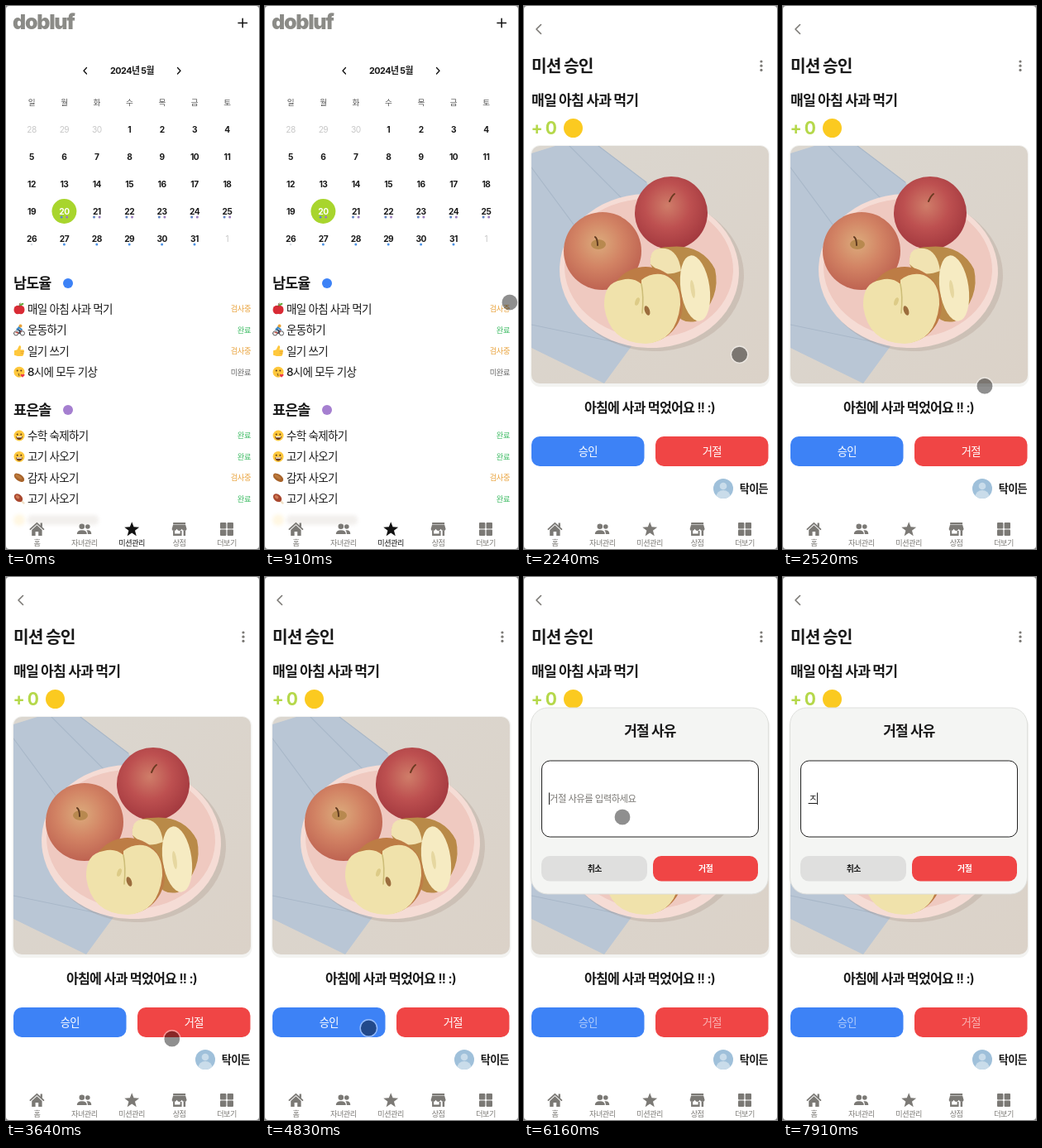
Recreate the animation shown at these times as an HTML page. Size 306 px wide and 656 px high, loop 8 s.

```html
<!DOCTYPE html>
<html lang="ko">
<head>
<meta charset="utf-8">
<title>미션 관리</title>
<style>
html, body { margin: 0; width: 100%; height: 100%; overflow: hidden; background: #888; }
svg { display: block; width: 306px; height: 656px; background: #fff; border-radius: 4px; }
text { font-family: Inter, "Noto Sans CJK KR", "Noto Sans CJK", sans-serif; letter-spacing: -.05em; white-space: pre; }
</style>
</head>
<body>
<svg id="stage" viewBox="0 0 306 656"></svg>
<script>
const INK = '#191919', GRAY = '#7b7975', BLUE = '#3d82f6', RED = '#f04545',
      GREEN = '#3dbb63', ORANGE = '#e9a23b', PURPLE = '#a57fd0';

// y is the visual middle of the line
const text = (x, y, s, size, weight = 400, fill = INK, anchor = 'start') =>
  `<text x="${x}" y="${y + size * .365}" font-size="${size}" font-weight="${weight}" fill="${fill}" text-anchor="${anchor}">${s}</text>`;
const mid = (x, y, s, size, weight, fill) => text(x, y, s, size, weight, fill, 'middle');
const rect = (x, y, w, h, r, fill, more = '') =>
  `<rect x="${x}" y="${y}" width="${w}" height="${h}" rx="${r}" fill="${fill}" ${more}/>`;
const dot = (x, y, r, fill, more = '') => `<circle cx="${x}" cy="${y}" r="${r}" fill="${fill}" ${more}/>`;
const oval = (x, y, rx, ry, fill, turn = 0) =>
  `<ellipse rx="${rx}" ry="${ry}" fill="${fill}" transform="translate(${x} ${y}) rotate(${turn})"/>`;
const shape = (d, fill) => `<path d="${d}" fill="${fill}"/>`;
const line = (d, color, w = 1.6) =>
  `<path d="${d}" fill="none" stroke="${color}" stroke-width="${w}" stroke-linecap="round" stroke-linejoin="round"/>`;
const group = (id, body) => `<g id="${id}">${body}</g>`;
const at = (x, y, body) => `<g transform="translate(${x} ${y})">${body}</g>`;

// small pictures, centred on 0,0
const face = dot(0, 0, 6.5, '#ffc83d') + dot(-2.3, -1.6, 1, '#5b3a12') + dot(2.3, -1.6, 1, '#5b3a12');
const emoji = {
  apple: oval(-2, 1, 4.5, 5.3, '#d92b35') + oval(2, 1, 4.5, 5.3, '#d92b35') +
    line('M0-3Q0-6 1-7', '#6b3d1e', 1) + oval(3, -5.5, 2.6, 1.2, '#63a83a', -25),
  bike: line('M-6.5 4a2.6 2.6 0 1 0 5.2 0a2.6 2.6 0 1 0-5.2 0M1.3 4a2.6 2.6 0 1 0 5.2 0a2.6 2.6 0 1 0-5.2 0', '#555', 1) +
    line('M-4 3L0 4L3 0', '#cf4a3f', 1.2) + line('M-2.5-1L1 1L0 4', '#34495e', 1.8) +
    line('M0-3.5L-2.5-.5M0-3L3-.5', '#3c8bc9', 2) + dot(1.5, -5, 2, '#e8a33d'),
  thumb: shape('M-6-.5L-2.5-1.5L0-6.5Q2.3-7 2.2-4.5L1.5-1.5H5Q6.5-1 5.8 .7L5 5Q4.5 6.3 3 6.3H-2L-6 5Z', '#ffc83d') +
    line('M2 .8H5.3M2 3H5', '#e0962a', .7),
  kiss: face + line('M-1 2q1.8.3.3 1.4q1.8.3.2 1.4', '#5b3a12', .8) +
    shape('M4 6.5L1.5 3.7Q2 1.8 4 3Q6 1.8 6.7 3.7Z', '#ec3b4c'),
  grin: face + shape('M-4 1H4Q3.2 5 0 5T-4 1', '#6b3a1a') + rect(-3, 1, 6, 1.3, .3, '#fff'),
  potato: oval(0, 0, 7, 4, '#a8642b', 35) + oval(-.8, -1, 4.6, 1.6, '#bd7a3c', 35),
  meat: line('M2 2L5.5 5.5', '#f0e0c8', 2.4) + oval(-1, -1, 5.8, 4.2, '#a9482f', 40) + oval(-2, -2, 2.6, 1.8, '#d07a55', 40),
};

const star = Array.from({ length: 10 }, (_, i) => {
  const r = i % 2 ? 4 : 9.4, a = i * Math.PI / 5;
  return `${r * Math.sin(a)} ${.6 - r * Math.cos(a)}`;
}).join('L');
const icons = {
  '홈': c => line('M-8 .2L0-7.2L8 .2', c, 1.8) + rect(4.2, -7.5, 2.3, 5, 0, c) +
    shape('M0-4.8L6.2 1V8H1.8V3H-1.8V8H-6.2V1Z', c),
  '자녀관리': c => dot(-3, -3.2, 3.3, c) + dot(4, -3, 2.8, c) +
    shape('M-9 6Q-9 1.2-3 1.2T3 6ZM4.2 6Q4.2 3 2.6 1.3Q8.5.5 8.5 6Z', c),
  '미션관리': c => shape(`M${star}Z`, c),
  '상점': c => rect(-7.5, -8, 15, 2, .5, c) +
    shape('M-7.5-5.4H7.5L9 0Q8.5 2 6.5 2Q4 2 3-.3Q2 2 0 2T-3-.3Q-4 2-6.5 2T-9 0Z', c) +
    shape('M-7.5 2H-5.5V5.5H1V2H3V8H-7.5ZM5 2H7.5V8H5Z', c),
  '더보기': c => [-8, .6].map(x => [-8, .6].map(y => rect(x, y, 7.4, 7.4, 1, c)).join('')).join(''),
};
const tabs = active => Object.entries(icons).map(([name, icon], i) => {
  const x = 37.4 + i * 57.4, color = name === active ? '#111' : GRAY;
  return at(x, 632, icon(color)) + mid(x, 649, name, 9.1, 400, color);
}).join('');

const column = i => 31 + i * 39.4;
function calendar() {
  let out = line('M97.5 74.5L94 78.2L97.5 82M207.5 74.5L211 78.2L207.5 82', '#111', 1.3) +
    mid(152.5, 78, '2024년 5월', 10.8, 700);
  [...'일월화수목금토'].forEach((d, i) => out += mid(column(i), 116, d, 9.6, 400, '#555'));
  for (let i = 0; i < 35; i++) {
    const day = i - 2, x = column(i % 7), y = 149 + Math.floor(i / 7) * 33;
    const outside = day < 1 || day > 31, chosen = day === 20;
    if (chosen) out += dot(x, y, 15, '#a8d52d');
    out += mid(x, y, day < 1 ? day + 30 : day > 31 ? 1 : day, 10.2, outside ? 400 : 700,
      chosen ? '#fff' : outside ? '#c8c8c8' : INK);
    if (day >= 20 && day < 26) out += dot(x - 3.3, y + 7, 1.5, '#5f83c4') + dot(x + 3.3, y + 7, 1.5, '#9a7bbd');
    if (day > 26 && !outside) out += dot(x, y + 7, 1.5, '#4a90e2');
    if (day === 26) out += dot(x, y + 7, 1.3, '#d5dbe3');
  }
  return out;
}

const state = { '검사중': ORANGE, '완료': GREEN, '미완료': '#666' };
const person = (y, name, color, rows) => text(9, y, name, 17.4, 700) + dot(75, y, 6, color) +
  rows.map(([pic, job, s], i) => {
    const ry = y + 31 + i * 25.4;
    return at(16, ry, emoji[pic]) + text(26, ry, job, 13.5, 500) + text(296, ry, s, 9.3, 400, state[s], 'end');
  }).join('');

const listPage = text(8, 19, 'dobluf', 25, 900, '#8b8b87') + line('M281 20.5H291.5M286.2 15.2V25.8', '#111', 1.5) +
  calendar() +
  person(335, '남도율', BLUE, [['apple', '매일 아침 사과 먹기', '검사중'], ['bike', '운동하기', '완료'],
    ['thumb', '일기 쓰기', '검사중'], ['kiss', '8시에 모두 기상', '미완료']]) +
  person(488, '표은솔', PURPLE, [['grin', '수학 숙제하기', '완료'], ['grin', '고기 사오기', '완료'],
    ['potato', '감자 사오기', '검사중'], ['meat', '고기 사오기', '완료']]) +
  `<g opacity=".14" style="filter:blur(2px)">${dot(16, 621, 7, '#ffc83d')}${rect(26, 615, 86, 12, 5, '#a98')}</g>` +
  tabs('미션관리');

const reward = (y, s, coinX) => text(8.5, y, s, 21, 700, '#b5d84b') + dot(coinX, y, 11.5, '#fbca20');

const waiting = reward(95.5, '+', 41) + mid(152.5, 408, '아직 아이가 인증하지 않았어요...', 16.1, 700) +
  dot(276, 583, 11.5, '#fff', 'stroke="#ddd"') + dot(276, 580.3, 2.3, 'none', 'stroke="#222" stroke-width="1.2"') +
  line('M271.8 588V587Q271.8 584.8 274 584.8H278Q280.2 584.8 280.2 587V588', '#222', 1.2);

const photo = rect(9, 169, 287, 287, 0, 'url(#table)') +
  shape('M9 178L38 169H90L148 213L205 300L138 400L97 456L9 413Z', '#b9c6d5') +
  line('M55 169L122 236M90 169L148 213M9 195L66 272M9 385L120 408', '#a9b8c9', 1.2) +
  oval(156, 324, 110, 93, 'rgba(150,125,110,.22)', 3) + oval(151.5, 320, 108.5, 93, '#f5dcd5', 3) +
  oval(151, 317, 102, 84, '#efc9c0', 3) +
  oval(178, 250, 44, 44, 'url(#red)') + line('M176 236Q179 229 182 227', '#6a3a20', 2) +
  oval(95, 296, 47, 47, 'url(#blush)') + oval(90, 288, 9, 6, '#b8894f') + line('M89 289Q89 281 86 279', '#5f3a20', 2) +
  shape('M176 291Q215 287 231 318Q239 352 208 381Q190 384 185 372L153 312Q151 291 176 291Z', '#b98a48') +
  shape('M153 312Q151 290 171 293Q187 296 190 320Q175 326 165 322Z', '#f1e3b2') +
  oval(207, 341, 17.5, 40, '#f6ebc2', -8) + oval(204, 342, 2.5, 11, '#e6d7a0', -8) +
  oval(147, 361, 45, 46, '#bd7c45') +
  shape('M142 331Q155 321 170 325Q190 333 189 361Q184 406 147 408Q103 407 97 363Q96 334 118 331Q132 327 142 336Z', '#f0e2ab') +
  line('M142 336Q145 350 143 371', '#cdbd78', 1.6) + oval(137, 357, 2.5, 5, '#ddcb87', 20) + oval(149, 368, 3, 6, '#9c6d3d', -20);

const action = (x, color) => rect(x, 520, 136.5, 36, 10, color);
const detail = text(9, 72.5, '미션 승인', 20.3, 700) + [67, 72.2, 77.4].map(y => dot(287, y, 1.6, GRAY)).join('') +
  text(9, 114, '매일 아침 사과 먹기', 17.2, 700) + reward(147.5, '+ 0', 59.5) +
  rect(7.5, 168, 290, 292, 12, '#f3f3f1') + `<g clip-path="url(#frame)">${photo}</g>` +
  mid(152, 485, '아침에 사과 먹었어요 !! :)', 16.2, 600) +
  action(9, BLUE) + action(159, RED) +
  group('labels', mid(77.3, 538, '승인', 13.3, 500, '#fff') + mid(227.3, 538, '거절', 13.3, 500, '#fff')) +
  dot(241, 583, 12, '#9fc0da') + `<g clip-path="url(#face)">${dot(241, 580, 4.3, '#c9dcea')}${oval(241, 593, 8.5, 8, '#c9dcea')}</g>` +
  text(295, 583, '탁이든', 13.1, 600, INK, 'end');

const modal = rect(8.5, 158, 287, 225, 20, '#f4f5f3', 'stroke="#dedfdc"') + mid(152.5, 186, '거절 사유', 17, 700) +
  rect(21.5, 222, 262, 92, 10, '#fff', 'id="field"') +
  group('hint', text(31, 267.5, '거절 사유를 입력하세요', 11.4, 400, GRAY)) +
  group('typed', text(31, 267, 'ㅈ', 11.4) + line('M31 273.5H40.5', INK, 1)) +
  `<path id="caret" d="M0 260.5V275" stroke="#222"/>` +
  rect(21, 337, 128, 30.5, 10, '#dfdfde') + mid(85.3, 352, '취소', 9.9, 700) +
  rect(156, 337, 127, 30.5, 10, RED) + mid(219.7, 352, '거절', 9.9, 700, '#fff');

const ball = (id, ...stops) => `<radialGradient id="${id}" cx=".45" cy=".4" r=".62">` +
  stops.map((c, i) => `<stop offset="${i / (stops.length - 1)}" stop-color="${c}"/>`).join('') + '</radialGradient>';

const $ = id => document.getElementById(id);
$('stage').innerHTML = `<defs>
  ${ball('red', '#cf7d69', '#bd5050', '#a2383e')}${ball('blush', '#dcab7c', '#d28364', '#bd6150')}
  <linearGradient id="table" x2="1" y2="1"><stop stop-color="#dbd7d0"/><stop offset="1" stop-color="#dbd2c8"/></linearGradient>
  <clipPath id="frame">${rect(9, 169, 287, 287, 10, '#000')}</clipPath>
  <clipPath id="face">${dot(241, 583, 12, '#000')}</clipPath></defs>` +
  group('list', listPage) +
  group('mission', line('M20.5 22.5L15 28L20.5 33.5', GRAY) + group('waiting', waiting) + group('detail', detail) + tabs()) +
  group('modal', modal) +
  group('touch', dot(0, 0, 9.5, 'rgba(0,0,0,.44)') + dot(0, 0, 10.2, 'none', 'stroke="rgba(255,255,255,.45)" stroke-width="1.4"'));

// pointer path: time, x, y
const path = [
  [770, 316, 352], [910, 296, 358], [1190, 282, 367], [1680, 282, 367], [2100, 269, 402], [2520, 244, 459],
  [2870, 234, 530], [3150, 233, 541], [3640, 201, 558], [3780, 170, 560], [3920, 132, 551], [4130, 106, 546],
  [4480, 125, 545], [4830, 125, 545], [5110, 227, 543], [5250, 227, 542], [5600, 131, 322], [5880, 119, 290], [8000, 119, 290],
];
function pointer(t) {
  const i = Math.max(1, path.findIndex(p => p[0] > t));
  const [a, b] = [path[i - 1], path[i]];
  const k = Math.min(1, Math.max(0, (t - a[0]) / (b[0] - a[0])));
  return [1, 2].map(n => a[n] + (b[n] - a[n]) * k);
}

const show = (id, on) => $(id).style.display = on ? '' : 'none';

function draw(now) {
  const t = now % 8000;
  const open = t >= 5250, focus = t >= 6090;
  const typed = t >= 6650 && t < 7000 || t >= 7910;
  show('list', t < 1680);
  show('mission', t >= 1680);
  show('waiting', t < 1820);
  show('detail', t >= 1820);
  show('modal', open);
  show('hint', !typed);
  show('typed', typed);
  show('caret', focus);
  $('labels').setAttribute('opacity', open ? .6 : 1);
  $('field').setAttribute('stroke', focus ? '#222' : '#ccc');
  $('caret').setAttribute('transform', `translate(${typed ? 41.5 : 30.5})`);
  show('touch', t >= 770 && t < 6440);
  $('touch').setAttribute('opacity', t < 6370 ? 1 : .5);
  $('touch').setAttribute('transform', `translate(${pointer(t)})`);
}

const start = performance.now();
function tick() {
  draw(performance.now() - start);
  requestAnimationFrame(tick);
}
tick();
</script>
</body>
</html>
```
